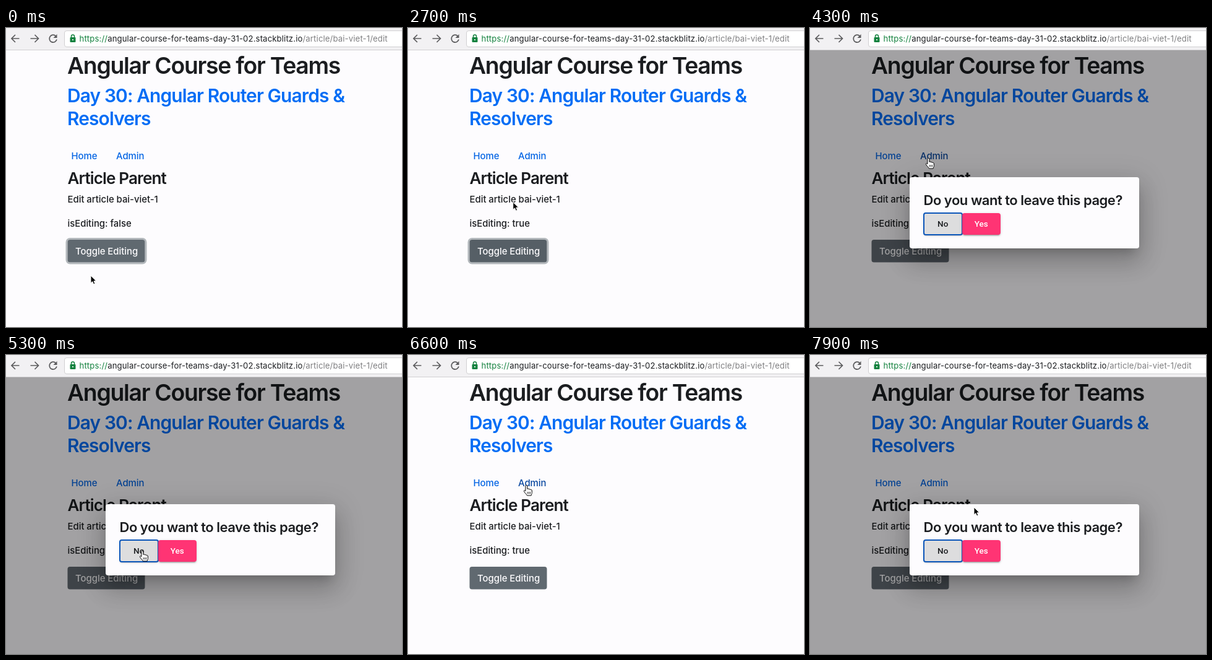
Recreate the animation shown at these times as an HTML page. Size 640x483 px, loop 8 s.

```html
<!DOCTYPE html>
<html lang="en">
<head>
<meta charset="utf-8">
<title>Leave page guard</title>
<style>
html, body { margin: 0; width: 100%; height: 100%; overflow: hidden; background: #fdfcfe; }
#stage { position: absolute; left: 0; top: 0; width: 640px; height: 483px; overflow: hidden; }
#stage > svg { position: absolute; left: 0; top: 0; }
text, #dialog { font-family: Inter, "Open Sans", sans-serif; font-optical-sizing: none; }
text { white-space: pre; fill: #1b1d20; }
.h1, .h2, .h3 { font-weight: 600; letter-spacing: -.034em; }
.h1 { font-size: 37.3px; }
.h2 { font-size: 29.9px; letter-spacing: -.029em; fill: #036df5; }
.h3 { font-size: 26.1px; }
.p { font-size: 14.9px; font-weight: 450; letter-spacing: -.02px; }
.link { fill: #0465e4; }
.url { font-size: 13.1px; letter-spacing: .15px; }
#backdrop { position: absolute; left: 0; top: 36px; width: 640px; height: 447px; background: #000; }
#dialog { position: absolute; left: 160.5px; top: 240.5px; width: 371px; height: 115.5px;
  border-radius: 4px; background: #fdfcfe; color: #1b1d20;
  box-shadow: 0 11px 15px -7px rgba(0,0,0,.2), 0 23px 37px 3px rgba(0,0,0,.14), 0 9px 44px 8px rgba(0,0,0,.12); }
#dialog div { position: absolute; box-sizing: border-box; white-space: nowrap; }
#ask { left: 23px; top: 25.5px; line-height: 24px; font-size: 22px; font-weight: 600; letter-spacing: -.022em; }
#dialog .btn { top: 58.5px; width: 61.5px; height: 34.5px; border-radius: 4px;
  text-align: center; font: 500 13.5px/34.5px Roboto, Arial, sans-serif;
  box-shadow: 0 3px 1px -2px rgba(0,0,0,.2), 0 2px 2px rgba(0,0,0,.14), 0 1px 5px rgba(0,0,0,.12); }
#no { left: 23.5px; }
#yes { left: 85.5px; background: #ff3474; color: #fff; }
#ring { inset: -1px; border: 2px solid #0d57ba; border-radius: 4px; }
</style>
</head>
<body>
<div id="stage">
  <svg width="640" height="483">
    <rect width="640" height="36" fill="#f2f1f3"/>
    <path d="M0 35.5H640" stroke="#d0cfd1"/>
    <rect x="94.5" y="4.5" width="570" height="26" rx="3.5" fill="#fff" stroke="#d0cfd1"/>
    <g fill="none" stroke="#5c5c5e" stroke-width="1.7">
      <path d="M21.5 17H9.5M15 11l-6 6 6 6"/>
      <path d="M39.5 17H52M46.5 11l6 6-6 6"/>
      <path d="M80.5 13A6 6 0 1 0 82 18.5"/>
    </g>
    <path d="M82.5 10v6h-6z" fill="#5c5c5e"/>
    <rect x="103.5" y="15" width="9" height="8" rx="1" fill="#14823f"/>
    <path d="M105.5 15.5v-2a2.5 2.5 0 0 1 5 0v2" fill="none" stroke="#14823f" stroke-width="1.5"/>
    <circle cx="108" cy="19" r="1.1" fill="#fff"/>
    <text class="url" x="118.5" y="21.8"><tspan fill="#14823f">https://</tspan>angular-course-for-teams-day-31-02.stackblitz.io<tspan fill="#7f7f81">/article/bai-viet-1/edit</tspan></text>

    <text class="h1" x="99" y="73.5">Angular Course for Teams</text>
    <text class="h2" x="99" y="120">Day 30: Angular Router Guards &amp;</text>
    <text class="h2" x="99" y="157">Resolvers</text>
    <text class="p link" x="105.5" y="211.5">Home</text>
    <text class="p link" x="178" y="211.5" id="admin">Admin</text>
    <text class="h3" x="99.5" y="251.5">Article Parent</text>
    <text class="p" x="99.5" y="282">Edit article bai-viet-1</text>
    <text class="p" x="99.5" y="320.5" id="status"></text>
    <rect id="focus" x="98" y="340.5" width="128" height="39.5" rx="5.5" fill="none" stroke="#b3b8bc" stroke-width="3"/>
    <rect id="toggle" x="99.5" y="342" width="125" height="36.5" rx="3.8"/>
    <text class="p" x="112" y="366" style="fill:#fdfcfe">Toggle Editing</text>
  </svg>
  <div id="backdrop"></div>
  <div id="dialog">
    <div id="ask">Do you want to leave this page?</div>
    <div class="btn" id="no">No<div id="ring"></div></div>
    <div class="btn" id="yes">Yes</div>
  </div>
  <svg width="640" height="483">
    <path id="arrow" d="M0 0V12.2L2.8 9.6 4.7 14 6.9 13.1 5 8.8H8.9Z" stroke="#fff" stroke-linejoin="round"/>
    <g id="hand" stroke="#000" stroke-linejoin="round">
      <path d="M-1.6 1.3a1.5 1.5 0 0 1 3 0V6c.4-1 2.6-.8 2.7.6.5-.8 2.3-.6 2.5.7.8-.6 2.2-.2 2.2 1.2V12c0 2-1 2.500-1.200 4.500H1C0 14.500-3 12-4 9.800-4.600 8-2.800 7.600-1.600 9.300Z" fill="#fff"/>
      <path d="M1.6 10.5v3.5m2.2-3.5v3.5m2.2-3.5v3.5" fill="none" stroke-width=".8"/>
    </g>
  </svg>
</div>
<script>
const LOOP = 8000, STEP = 100;
const TOGGLED = 1700, BLURRED = 3750, CLOSED = 5680, REOPENED = 7395, OPENED = 3895;
const HOVER_IN = 650, HOVER_OUT = 2650;
const SHADE = 0.36;

const start = { x: 137, y: 400 }, button = { x: 148, y: 352 }, admin = { x: 191.5, y: 210.5 };
const no = { x: 220.5, y: 316.5 }, away = { x: 265, y: 246 };
const moves = [
  { to: button, from: 200, until: 1000 },
  { to: admin, from: 2500, until: 2900 },
  { to: no, from: 4500, until: 5200 },
  { to: admin, from: 6000, until: 6500 },
  { to: away, from: 7500, until: 7900 }
];

const el = id => document.getElementById(id);
const progress = (t, from, length) => Math.max(0, Math.min(1, (t - from) / length));
const easeOut = (k, power) => 1 - (1 - k) ** power;
const easeInOut = k => k * k * (3 - 2 * k);
const fade = (t, from) => easeOut(progress(t, from, 150), 2);
const near = (p, spot, dx, dy) => Math.abs(p.x - spot.x) < dx && Math.abs(p.y - spot.y) < dy;

function pointerAt(t) {
  let { x, y } = start;
  for (const { to, from, until } of moves) {
    const k = easeInOut(progress(t, from, until - from));
    x += (to.x - x) * k;
    y += (to.y - y) * k;
  }
  return { x, y };
}

function drawPointer(p) {
  const hand = near(p, button, 50, 12) || near(p, admin, 20, 9) || near(p, no, 25, 17);
  for (const id of ["arrow", "hand"]) {
    el(id).setAttribute("transform", `translate(${p.x} ${p.y})`);
    el(id).style.display = (id === "hand") === hand ? "" : "none";
  }
}

function drawPage(t, p) {
  el("status").textContent = "isEditing: " + (t >= TOGGLED);
  el("focus").style.opacity = 1 - fade(t, BLURRED);
  const hover = fade(t, HOVER_IN) - fade(t, HOVER_OUT);
  const tone = [96, 105, 112].map(c => Math.round(c - 22 * hover));
  el("toggle").setAttribute("fill", `rgb(${tone})`);
  el("admin").style.fill = near(p, admin, 20, 9) ? "#0a48a0" : "";
}

function drawDialog(t) {
  const again = t >= REOPENED;
  const from = again ? REOPENED : OPENED;
  const dim = at => easeOut(progress(t, at, 400), 4);
  const shown = easeOut(progress(t, from, 150), 2.3);
  const gone = again ? 0 : progress(t, CLOSED, 75);
  const grey = 253 - 32 * fade(t, from + 150);
  el("backdrop").style.opacity = SHADE * (dim(from) - (again ? 0 : dim(CLOSED)));
  el("dialog").style.opacity = shown * (1 - gone);
  el("dialog").style.transform = `scale(${.7 + .3 * shown})`;
  el("ring").style.display = t >= from + 150 ? "" : "none";
  el("no").style.background = `rgb(${grey},${grey},${grey + 1})`;
}

const begin = performance.now();
function draw() {
  const now = Math.max(0, performance.now() - begin) % LOOP;
  const t = Math.floor(now / STEP) * STEP;
  const p = pointerAt(t);
  drawPage(t, p);
  drawDialog(t);
  drawPointer(p);
  requestAnimationFrame(draw);
}
draw();
</script>
</body>
</html>
```
